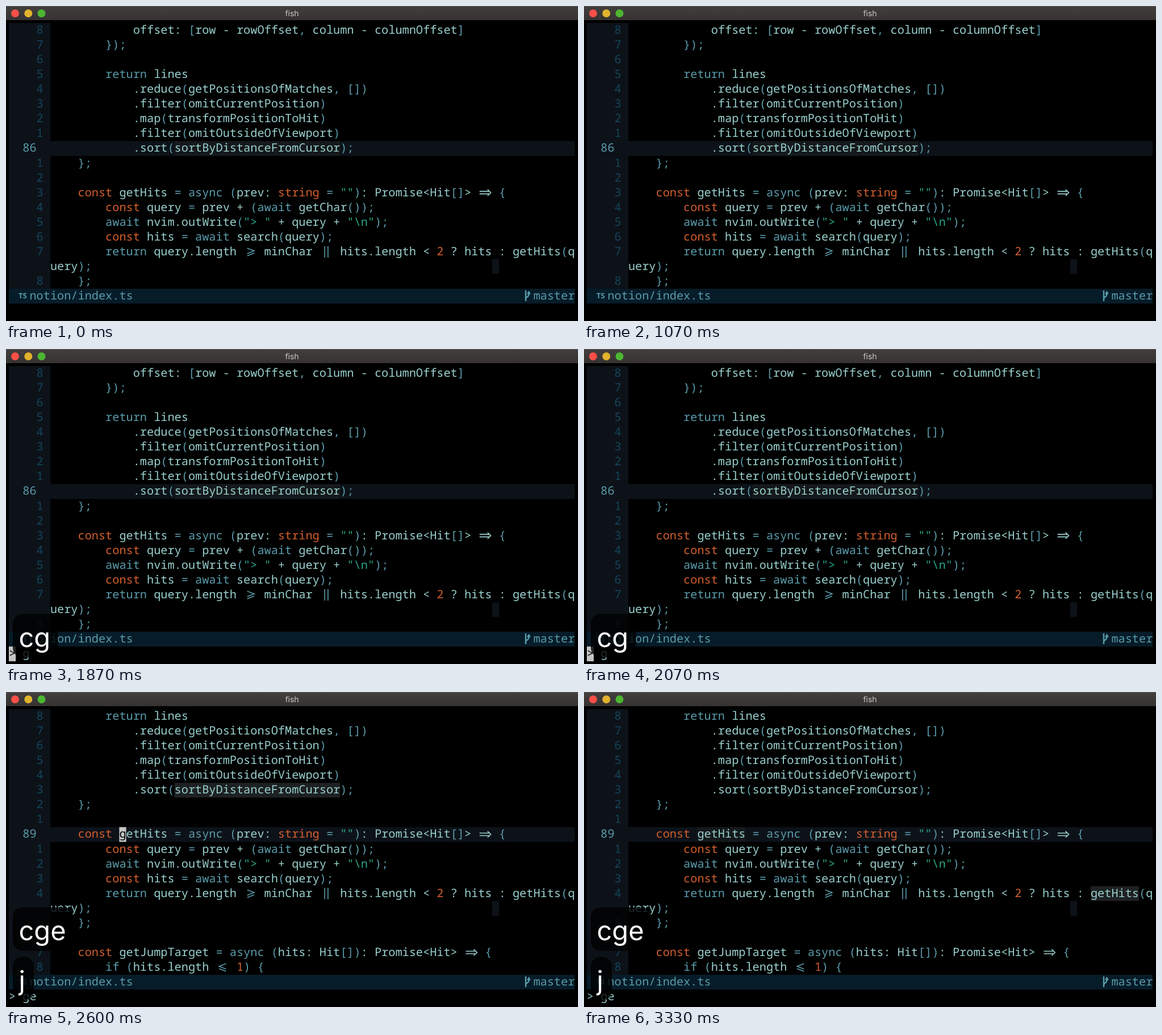
Write an HTML page that moves like this. It is 1007x556 px and loops after 3390 ms.

```html
<!DOCTYPE html>
<html lang="en">
<head>
<meta charset="utf-8">
<title>fish</title>
<style>
  html, body { margin: 0; width: 100%; height: 100%; overflow: hidden; background: #000; }
  svg { display: block; width: 1007px; height: 556px; }
  text { white-space: pre; text-rendering: geometricPrecision; }
  .mono { font: 20.25px "Noto Sans Mono", "DejaVu Sans Mono", monospace; }
  .bold { font-weight: 700; }
  .key { font: 47px Inter, "Liberation Sans", sans-serif; fill: #fff; }
  .title { font: 14px Inter, sans-serif; fill: #c9c7c6; text-anchor: middle; }
  .icon { font: 700 13px "Open Sans", sans-serif; }
</style>
</head>
<body>
<svg viewBox="0 0 1007 556">
  <defs>
    <linearGradient id="bar" x2="0" y2="1">
      <stop stop-color="#423f3e"/><stop offset="1" stop-color="#353231"/>
    </linearGradient>
  </defs>
  <rect width="1007" height="556"/>
  <rect width="1007" height="25" fill="url(#bar)"/>
  <rect width="1007" height="1" fill="#5b5857"/>
  <circle cx="16" cy="13" r="7" fill="#fc4f48"/>
  <circle cx="39.3" cy="13" r="7" fill="#e3b32d"/>
  <circle cx="62.5" cy="13" r="7" fill="#4cb631"/>
  <text class="title" x="503.5" y="18">fish</text>
  <g id="screen"></g>
</svg>
<script>
const LOOP = 3390;
const CW = 12.15, RH = 26.06, LEFT = 5, TOP = 30, GUTTER = 6;
const C = {
  text: '#99d1ce', cyan: '#599cab', orange: '#d45f2d', green: '#2aa889',
  num: '#14455a', panel: '#0d1219', status: '#071c29', word: '#1e2122',
  wordOnLine: '#15191c', cursor: '#c6c6c6', label: '#d93a22', labelBack: '#15181c'
};

const CODE = [
  '            offset: [row - rowOffset, column - columnOffset]',
  '        });',
  '',
  '        return lines',
  '            .reduce(getPositionsOfMatches, [])',
  '            .filter(omitCurrentPosition)',
  '            .map(transformPositionToHit)',
  '            .filter(omitOutsideOfViewport)',
  '            .sort(sortByDistanceFromCursor);',
  '    };',
  '',
  '    const getHits = async (prev: string = ""): Promise<Hit[]> => {',
  '        const query = prev + (await getChar());',
  '        await nvim.outWrite("> " + query + "\\n");',
  '        const hits = await search(query);',
  '        return query.length >= minChar || hits.length < 2 ? hits : getHits(q',
  'uery);',
  '    };',
  '',
  '    const getJumpTarget = async (hits: Hit[]): Promise<Hit> => {',
  '        if (hits.length <= 1) {'
];
const WRAPPED = 16, ROWS = 18, CURRENT = 8, STATUS = 18, CMD = 19;

// Ligatures drawn over two cells
const LIGATURES = {
  '=>': ['M2.5 10.5H19.5M2.5 15H19.5M16.5 7.2L22.3 12.75L16.5 18.3', C.text],
  '>=': ['M6.5 6.5L18.8 11.3L6.5 16.1M18.8 15.2L6.5 20', C.cyan],
  '<=': ['M17.8 6.5L5.5 11.3L17.8 16.1M5.5 15.2L17.8 20', C.cyan],
  '||': ['M9.2 3V23M15.1 3V23', C.cyan]
};
const TOKENS = /"[^"]*"|[=><]=|=>|\|\||[\w.]+|[^\s\w]/g;

// Changes of state: time and what is new from then on
const STEPS = [
  [0, { first: 0, cursor: null, word: [8, 18, 24], echo: [], keys: [], cmd: '', labels: false }],
  [130, { cursor: [8, 20, 'r'] }],
  [670, { cursor: null }],
  [1130, { cursor: [CMD, -6, ''], keys: ['c'] }],
  [1670, { cursor: null }],
  [1870, { cursor: [CMD, -6, '>'], keys: ['cg'], cmd: '> g' }],
  [2400, { keys: ['cge'] }],
  [2470, { cmd: '> ge', labels: true }],
  [2600, { first: 3, cursor: [8, 10, 'g'], word: null, echo: [5, 18, 24], keys: ['cge', 'j'], labels: false }],
  [2730, { word: [8, 10, 7], echo: [12, 67, 7] }],
  [3130, { cursor: null }]
];
const LABELS = [[4, 20, 'k'], [11, 10, 'j'], [12, 36, 'f'], [15, 67, 'd']];

const colX = col => LEFT + (col + GUTTER) * CW;
const rowY = row => TOP + row * RH;
const esc = s => s.replace(/&/g, '&amp;').replace(/</g, '&lt;').replace(/>/g, '&gt;');
const rect = (x, y, w, h, fill, extra = '') =>
  `<rect x="${x}" y="${y}" width="${w}" height="${h}" fill="${fill}" ${extra}/>`;
const cells = (row, col, n, fill) => rect(colX(col), rowY(row), n * CW, RH, fill);
const mono = (row, col, s, fill, weight = '') =>
  `<text class="mono ${weight}" x="${colX(col)}" y="${rowY(row) + 19}" fill="${fill}">${esc(s)}</text>`;

function colorOf(token) {
  if (token[0] === '"') return C.green;
  if (/^(const|string|\d+)$/.test(token)) return C.orange;
  if (/^(return|async|await|if|[()[\]{};,=])$/.test(token)) return C.cyan;
  return C.text;
}

function codeRow(row, line) {
  return [...line.matchAll(TOKENS)].map(m => {
    const lig = LIGATURES[m[0]];
    return lig
      ? `<path transform="translate(${colX(m.index)} ${rowY(row)})" d="${lig[0]}" fill="none" stroke="${lig[1]}" stroke-width="1.6"/>`
      : mono(row, m.index, m[0], colorOf(m[0]));
  }).join('');
}

function lineNumber(row, first) {
  if (row === CURRENT) return mono(row, -4, String(first ? 89 : 86), C.cyan);
  const wrap = WRAPPED - first;
  if (row === wrap) return '';
  const n = Math.abs(row - CURRENT) - (row > wrap ? 1 : 0);
  return mono(row, -2, String(n), C.num);
}

function statusLine() {
  const y = rowY(STATUS);
  return rect(LEFT, y, 996, RH, C.status) +
    `<text class="icon" x="22" y="${y + 17}" fill="${C.cyan}">TS</text>` +
    mono(STATUS, -3, 'notion/index.ts', C.cyan) +
    `<path d="M915 502V521M915 517.5Q915 514.5 918 513.2Q920.5 512 920.5 507" fill="none" stroke="${C.cyan}" stroke-width="2.4"/>` +
    `<path d="M916.8 508.5L920.5 502.5L924 508.5Z" fill="${C.cyan}"/>` +
    mono(STATUS, 70, 'master', C.cyan);
}

const KEY_WIDTH = { c: 26, g: 27.5, e: 27, j: 11 };

function keyBox(s, i, all) {
  const y = 467.5 - (all.length - 1 - i) * 87.5;
  const w = [...s].reduce((sum, ch) => sum + KEY_WIDTH[ch], 26);
  return rect(12, y, w, 77, '#000', 'rx="17" fill-opacity=".8"') +
    `<text class="key" x="22.5" y="${y + 58}">${s}</text>`;
}

function draw(s) {
  let out = rect(LEFT, TOP, GUTTER * CW, ROWS * RH, C.panel) +
    rect(LEFT, rowY(CURRENT), 996, RH, C.panel) +
    rect(855.8, rowY(WRAPPED - s.first), 12.2, RH, C.panel);
  if (s.word) out += cells(...s.word, C.wordOnLine);
  if (s.echo.length) out += cells(...s.echo, C.word);
  for (let row = 0; row < ROWS; row++)
    out += lineNumber(row, s.first) + codeRow(row, CODE[row + s.first]);
  if (s.labels)
    for (const [row, col, ch] of LABELS)
      out += cells(row, col, 1, C.labelBack) + mono(row, col, ch, C.label, 'bold');
  out += statusLine() + mono(CMD, -6, s.cmd, C.text);
  if (s.cursor) {
    const [row, col, ch] = s.cursor;
    out += cells(row, col, 1, C.cursor) + mono(row, col, ch, '#000');
  }
  return out + s.keys.map(keyBox).join('');
}

const screen = document.getElementById('screen');
const states = [];
for (const [, change] of STEPS) states.push({ ...states[states.length - 1], ...change });
const pictures = states.map(draw);

let shown = -1;
const start = performance.now();
function tick() {
  const t = (performance.now() - start) % LOOP;
  const now = STEPS.filter(step => step[0] <= t).length - 1;
  if (now !== shown) screen.innerHTML = pictures[shown = now];
  requestAnimationFrame(tick);
}
tick();
</script>
</body>
</html>
```
